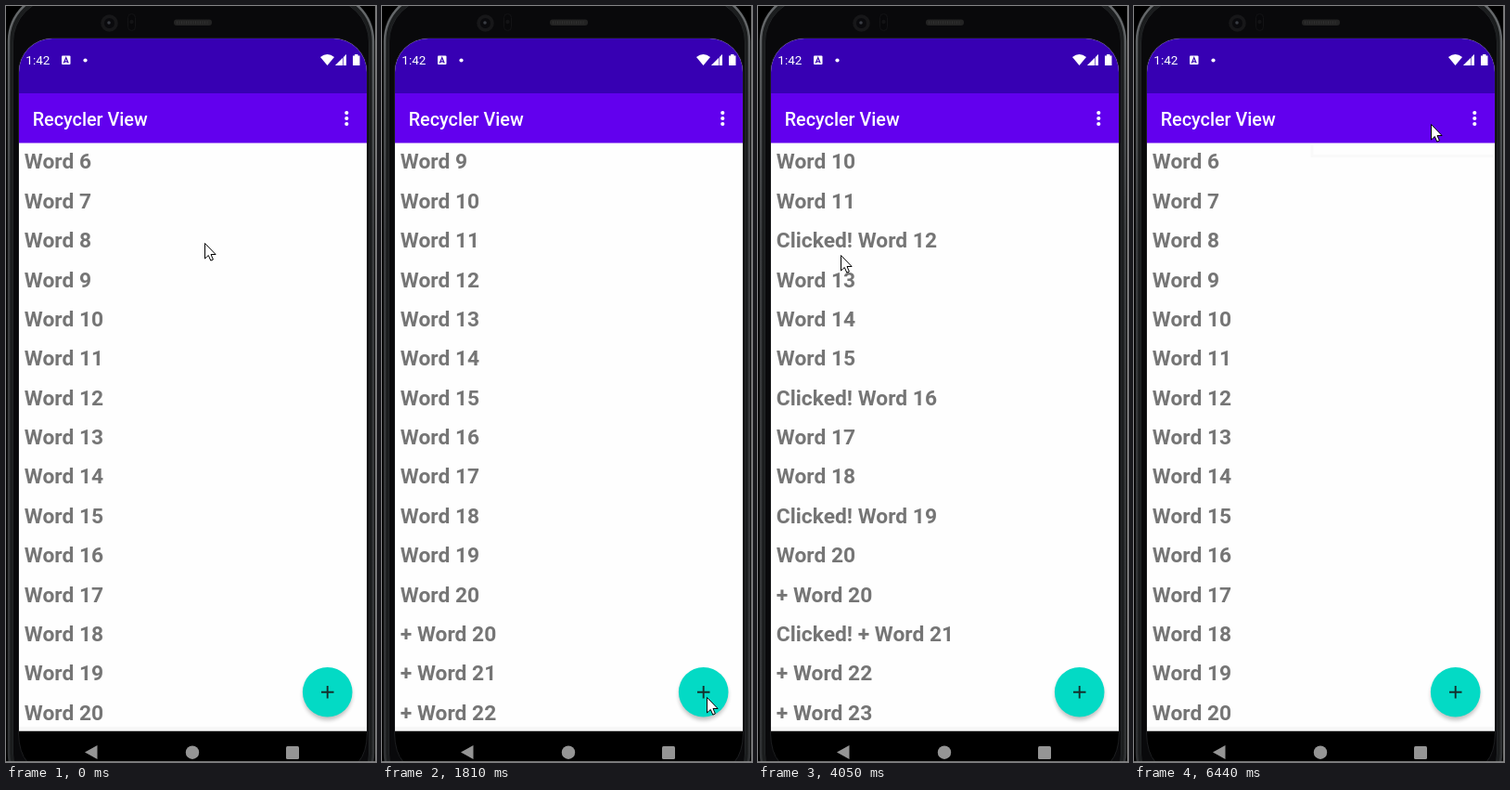
An HTML page for the animation above (7150 ms loop, 399 by 814 pixels).

```html
<!DOCTYPE html>
<html lang="en">
<head>
<meta charset="utf-8">
<title>Recycler View</title>
<style>
  html, body { margin: 0; width: 100%; height: 100%; overflow: hidden; background: #000; }
  svg { display: block; width: 399px; height: 814px; }
  text { font-family: Roboto, sans-serif; white-space: pre; }
  #list text { font-weight: 700; font-size: 22.8px; fill: #757575; }
</style>
</head>
<body>
<svg viewBox="0 0 399 814">
  <defs>
    <clipPath id="screen"><path d="M14 780.500V71A36 36 0 0 1 50 35H353A36 36 0 0 1 389 71V780.500Z"/></clipPath>
    <clipPath id="item"><rect x="197" y="106" width="113" height="46"/></clipPath>
    <filter id="blur" x="-30%" y="-30%" width="160%" height="160%"><feGaussianBlur stdDeviation="2"/></filter>
    <linearGradient id="edge" x2="0" y2="1">
      <stop offset="0" stop-color="#6a6d6f"/>
      <stop offset=".1" stop-color="#55585a"/>
      <stop offset=".3" stop-color="#3a3c3e"/>
      <stop offset="1" stop-color="#303234"/>
    </linearGradient>
  </defs>

  <!-- phone body -->
  <rect width="399" height="814" fill="#000"/>
  <rect x="3" y="-14" width="393" height="870" rx="52" fill="#1b1d1e" stroke="url(#edge)" stroke-width="2.500"/>
  <rect x="7.500" y="-8" width="384" height="860" rx="47" fill="#09090b" stroke="#222426"/>
  <path d="M13.500 780V71A36.500 36.500 0 0 1 50 34.500H353A36.500 36.500 0 0 1 389.500 71V783Q389 804 380 814H23Q14 804 13.500 783Z" fill="#000" stroke="#1c1d1f"/>
  <rect x="181" y="14.500" width="41" height="6.500" rx="3" fill="#232323"/>
  <path d="M184 17.700H219" stroke="#303030" stroke-width="3" stroke-dasharray="1 1.500"/>
  <circle cx="111.500" cy="18.500" r="9.300" fill="#171719"/>
  <circle cx="111.500" cy="18.500" r="5.500" fill="#0a0a0d"/>
  <circle cx="111" cy="18" r="1.800" fill="#3a3d44"/>
  <rect x="131.500" y="8.500" width="8" height="18" rx="4" fill="#08080a" stroke="#131315"/>
  <circle cx="135.500" cy="17" r="2.200" fill="#131315"/>

  <!-- app -->
  <g clip-path="url(#screen)">
    <rect x="14" y="35" width="375" height="746" fill="#fefefe"/>
    <rect x="14" y="35" width="375" height="59" fill="#3700b3"/>
    <rect x="14" y="94" width="375" height="53.500" fill="#6200ee"/>
    <g id="list"></g>
    <rect x="14" y="776" width="375" height="5" fill="#f8f8f8"/>
  </g>

  <!-- status bar and title -->
  <g fill="#fff">
    <text x="21.300" y="63.300" font-size="13.500">1:42</text>
    <rect x="60" y="53.500" width="9.500" height="9.500" rx="1"/>
    <circle cx="85.500" cy="58.500" r="2.100"/>
    <path d="M339 55Q346.500 49 354 55L346.500 64Z"/>
    <path d="M355 64L367 52V64Z" fill-opacity=".35"/>
    <path d="M355 64L363 56V64ZM364 55L367 52V64H364Z"/>
    <path d="M374 53.500H376V52H379.500V53.500H381.500V64H374Z"/>
    <text x="28.700" y="128.600" font-size="19.800" font-weight="500">Recycler View</text>
    <circle cx="367.300" cy="115" r="2.100"/>
    <circle cx="367.300" cy="121" r="2.100"/>
    <circle cx="367.300" cy="127" r="2.100"/>
  </g>
  <path d="M62.300 61.500L64.750 55.500L67.200 61.500M63.200 59.800H66.300" fill="none" stroke="#3700b3" stroke-width="1.200"/>

  <!-- navigation -->
  <g fill="#959595">
    <path d="M85 803.500L98.500 796V811Z"/>
    <circle cx="201" cy="803.700" r="7.200"/>
    <rect x="302" y="797" width="14" height="14" rx="1.500"/>
  </g>

  <!-- add button -->
  <ellipse id="shade" cx="346.700" cy="742" rx="26.500" ry="27" filter="url(#blur)"/>
  <circle id="fab" cx="346.700" cy="738.800" r="26.800"/>
  <path d="M340 738.800H353.500M346.700 732V745.600" stroke="#14302d" stroke-width="1.900"/>

  <!-- overflow menu -->
  <g id="menu">
    <rect x="197" y="99.500" width="188" height="61" rx="4" fill="#000" opacity=".32" filter="url(#blur)"/>
    <rect x="197" y="98" width="188" height="61.500" rx="4" fill="#fefefe"/>
    <circle id="ripple" cx="320" cy="127" r="87" fill="#f2f2f2" clip-path="url(#item)"/>
    <text x="212.500" y="134.800" font-size="15.300" fill="#212121">Settings</text>
  </g>
  <path id="trace" d="M192 150V161.500H388" fill="none" stroke="#f9f9f9" stroke-width="3"/>

  <!-- click halos -->
  <g id="tapMore">
    <circle cx="366" cy="127.500" r="34" fill="#808080" fill-opacity=".16"/>
    <circle cx="367.500" cy="123" r="16.500" fill="#fff" fill-opacity=".17"/>
  </g>
  <g id="tapItem">
    <circle cx="321" cy="127" r="32" fill="#eaeaea" stroke="#dedede" stroke-width="4"/>
    <circle cx="321" cy="127" r="13" fill="#f0f0f0"/>
  </g>

  <path id="cursor" d="M0 0V16.500L3.800 13L6.300 18.600L8.900 17.500L6.500 12H11.600Z" fill="#fff" stroke="#000"/>
  <path d="M398.500 0V814M0 813.500H399" stroke="#8c8c8c" stroke-width=".8"/>
</svg>
<script>
const LOOP = 7150, ROWS = 15, PITCH = 42.38;
const $ = id => document.getElementById(id);

// Each track is [start ms, value...]; a value holds until the next start.
const cursorTrack = [[0, 214.5, 255.5], [430, 352.5, 738.5], [1510, 350.5, 744.5], [2380, 100.5, 690.5],
  [2960, 95.5, 548.5], [3380, 84.5, 415.5], [3930, 89.5, 268.5], [5160, 367.5, 129.5], [5520, 320.5, 127.5]];
const pressTrack = [[0, 0], [550, 1], [820, .4], [970, 1], [1240, .5], [1360, 0],
  [1510, 1], [1660, .5], [1810, 0], [1960, 1], [2110, .5], [2230, 0]];
const menuTrack = [[0, 0], [5280, .5], [5400, 1], [6320, .5], [6440, 0]];
const addTimes = [670, 970, 1510, 1960];
const clicks = { "+ Word 21": 2530, "Word 19": 3080, "Word 16": 3500, "Word 12": 4050 };
const RESET = 6320;

const words = Array.from({ length: 21 }, (_, i) => "Word " + i)
  .concat(addTimes.map((_, i) => "+ Word " + (20 + i)));

const rows = Array.from({ length: ROWS }, (_, i) => {
  const row = document.createElementNS("http://www.w3.org/2000/svg", "text");
  row.setAttribute("x", 19.8);
  row.setAttribute("y", 175.4 + PITCH * i);
  return $("list").appendChild(row);
});

const at = (track, t) => track.filter(k => k[0] <= t).pop().slice(1);
const show = (id, on) => $(id).setAttribute("visibility", on ? "visible" : "hidden");
const mix = (a, b, p) => Math.round(a + (b - a) * p);

function draw(t) {
  const live = t < RESET;
  const first = 6 + (live ? addTimes.filter(a => a <= t).length : 0);
  rows.forEach((row, i) => {
    const word = words[first + i];
    const label = live && t >= clicks[word] ? "Clicked! " + word : word;
    if (row.textContent !== label) row.textContent = label;
  });

  const [press] = at(pressTrack, t);
  $("fab").setAttribute("fill", `rgb(3,${mix(218, 174, press)},${mix(197, 157, press)})`);
  $("shade").setAttribute("opacity", .24 + .06 * press);
  $("shade").setAttribute("cy", 742 + 2 * press);

  const [menu] = at(menuTrack, t);
  $("menu").setAttribute("opacity", menu);
  show("ripple", t >= 6080 && t < 6320);
  show("trace", t >= 6440);
  show("tapMore", t >= 5160 && t < 5280);
  show("tapItem", t >= 6080 && t < 6200);

  const [x, y] = at(cursorTrack, t);
  $("cursor").setAttribute("transform", `translate(${x} ${y})`);
}

const start = performance.now();
function tick() {
  draw((performance.now() - start) % LOOP);
  requestAnimationFrame(tick);
}
tick();
</script>
</body>
</html>
```
